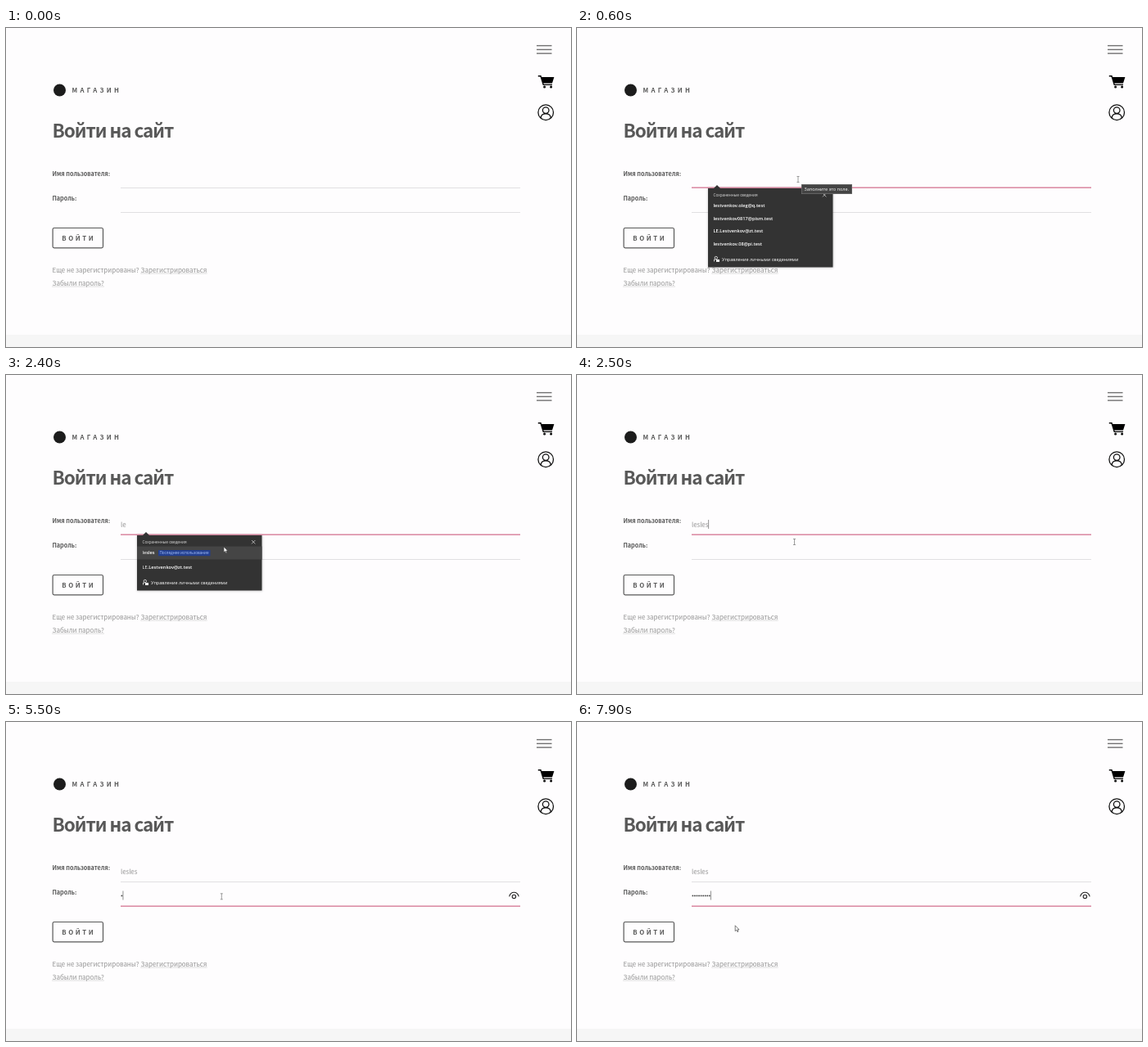
An HTML page with a canvas that plays this animation: 690x390 px, repeating every 8 s.

```html
<!DOCTYPE html>
<html lang="ru">
<head>
<meta charset="utf-8">
<title>Войти на сайт</title>
<style>
html, body { margin: 0; width: 100%; height: 100%; overflow: hidden; background: #fefdfe; }
canvas { display: block; width: 690px; height: 390px; }
</style>
</head>
<body>
<canvas id="stage"></canvas>
<script>
const W = 690, H = 390, LOOP = 8000, STEP = 100;
const PAGE = '"Noto Sans CJK JP", "Noto Sans CJK SC", "Open Sans", sans-serif';
const UI = '"Open Sans", "Noto Sans", sans-serif';
const INK = '#585858', SOFT = '#969696', LINE = '#e1e0e2', PINK = '#dc8ea6', PANEL = '#333333';
const LOGIN = 'lesles';
const MAILS = ['lestvenkov.oleg@q.test', 'lestvenkov0817@pism.test',
  'LE.Lestvenkov@zt.test', 'lestvenkov.08@pi.test'];

// moments of the actions, in ms
const FOCUS_LOGIN = 100, LIST = 200, KEY_1 = 1100, FILTER = 1200, KEY_2 = 1700;
const HOVER = 2400, FILL = 2500, FOCUS_PASS = 4000;
const KEYS = [5500, 5700, 6000, 6300, 6500, 6800, 7200, 7600, 7800];

const canvas = document.getElementById('stage');
const dpr = window.devicePixelRatio || 1;
canvas.width = W * dpr;
canvas.height = H * dpr;
const c = canvas.getContext('2d');
c.scale(dpr, dpr);

const within = (t, from, to) => t >= from && t < to;

function text(s, x, y, size, weight = 400, color = INK, gap = 0, family = PAGE) {
  c.font = `${weight} ${size}px ${family}`;
  c.letterSpacing = gap + 'px';
  c.fillStyle = color;
  c.fillText(s, x, y);
  return c.measureText(s).width;
}

function box(x, y, w, h, color) {
  c.fillStyle = color;
  c.fillRect(x, y, w, h);
}

function stroke(path, color, width) {
  c.strokeStyle = color;
  c.lineWidth = width;
  c.stroke(new Path2D(path));
}

function disc(x, y, r, color) {
  c.fillStyle = color;
  c.beginPath();
  c.arc(x, y, r, 0, Math.PI * 2);
  c.fill();
}

function link(s, x, y) {
  const w = text(s, x, y, 8, 300, SOFT, -0.04);
  c.setLineDash([1, 1]);
  stroke(`M${x} ${y + 1.5}h${w}`, '#bcbcbc', 1);
  c.setLineDash([]);
}

function icons() {
  for (const y of [21.6, 26.4, 31.1]) stroke(`M648 ${y}h18.5`, '#707070', 1.4);

  c.fillStyle = '#000';
  c.fill(new Path2D('M653.6 60H669.4L667 67.6H655.6Z'));
  stroke('M649.8 58.8H653L656.2 69.4H667', '#000', 1.4);
  disc(657.6, 72, 1.5, '#000');
  disc(665.6, 72, 1.5, '#000');

  stroke('M668.5 103.2a9.3 9.3 0 1 1-18.6 0a9.3 9.3 0 1 1 18.6 0' +
    'M663 100.6a3.8 3.8 0 1 1-7.6 0a3.8 3.8 0 1 1 7.6 0' +
    'M653.2 109.6C653.8 103.3 664.6 103.3 665.2 109.6', '#111', 1.3);
}

function page() {
  box(0, 0, W, H, '#fefdfe');
  box(0, 375, W, 15, '#f6f6f6');
  disc(65.5, 76, 7.5, '#1c1c1c');
  text('МАГАЗИН', 80.6, 79.4, 7.8, 900, INK, 3.3);
  text('Войти на сайт', 56.5, 134, 22.5, 700, INK, -1.05);
  text('Имя пользователя:', 56.5, 181, 7.2, 900);
  text('Пароль:', 56.5, 211, 7.2, 900);
  c.strokeStyle = INK;
  c.lineWidth = 1.2;
  c.beginPath();
  c.roundRect(57.1, 244.5, 61.4, 24.4, 1.8);
  c.stroke();
  text('ВОЙТИ', 68.3, 259.8, 7.8, 900, INK, 2.6);
  text('Еще не зарегистрированы?', 56.5, 298.6, 8, 300, SOFT, -0.06);
  link('Зарегистрироваться', 164.6, 298.6);
  link('Забыли пароль?', 56.5, 314.6);
  icons();
}

function field(y, focus) {
  if (focus) box(140, y - 0.6, 488, 1.6, PINK);
  else box(140, y, 488, 1, LINE);
}

function caret(x, y) {
  box(x, y, 0.8, 11, '#777');
}

function ibeam(x, y) {
  stroke(`M${x - 1.5} ${y - 3.5}h3M${x} ${y - 3.5}v7M${x - 1.5} ${y + 3.5}h3`, '#858585', 0.8);
}

function arrow(x, y) {
  const p = new Path2D(`M${x} ${y}v6.8l1.6-1.4l1.1 2.4l1.1-.5l-1-2.3h2Z`);
  c.fillStyle = '#fff';
  c.fill(p);
  c.strokeStyle = '#444';
  c.lineWidth = 0.7;
  c.stroke(p);
}

function tooltip(x, y) {
  box(x, y, 62, 12, '#777');
  box(x + 0.6, y + 0.6, 60.8, 10.8, '#444');
  text('Заполните это поле.', x + 3.5, y + 8, 5.5, 400, '#fff', 0, UI);
}

function panel(bottom) {
  c.save();
  c.shadowColor = 'rgba(0,0,0,.22)';
  c.shadowBlur = 3 * dpr;
  box(160, 196, 152.5, bottom - 196, PANEL);
  c.restore();
  c.fillStyle = PANEL;
  c.fill(new Path2D('M167 196l4-4l4 4Z'));
  text('Сохраненные сведения', 166.5, 206.2, 4.7, 400, '#ddd', 0, UI);
  stroke('M300 202l4.4 4.4m0-4.4l-4.4 4.4', '#ddd', 0.7);
  const y = bottom - 9.5;
  stroke(`M167.5 ${y + 2.5}v-2.5h2M171.5 ${y - 2}a1.7 1.7 0 1 0-3.4 0a1.7 1.7 0 1 0 3.4 0`, '#eee', 0.8);
  box(170, y, 4, 3, '#eee');
  text('Управление личными сведениями', 177, y + 2.3, 5.5, 400, '#fff', 0, UI);
}

// the part already typed is set lighter
function row(s, y, done = 0) {
  const w = text(s.slice(0, done), 166.5, y, 5.7, 400, '#fff', 0, UI);
  text(s.slice(done), 166.5 + w, y, 5.7, 600, '#fff', 0, UI);
}

function fullList() {
  panel(292.5);
  MAILS.forEach((s, i) => row(s, 219 + i * 15.6));
}

function shortList(t) {
  const done = typed(t).length;
  panel(263.5);
  if (t < FILTER + STEP) box(160, 192, 152.5, 3.6, '#080808');
  if (t >= HOVER) box(160, 209.5, 152.5, 16, '#454545');
  row(LOGIN, 219.3, done);
  box(186, 214, 63.5, 7.2, '#233f8f');
  text('Последнее использование', 187.5, 219.4, 4.6, 400, '#a9c4ff', 0, UI);
  row(MAILS[2], 236.5, done);
}

function eye() {
  stroke('M614.6 213.4C616.4 206.6 624.4 206.6 626.2 213.4', '#222', 1.1);
  stroke('M622.6 213.4a2.2 2.2 0 1 1-4.4 0a2.2 2.2 0 1 1 4.4 0', '#222', 1.1);
}

function typed(t) {
  if (t >= FILL) return LOGIN;
  return LOGIN.slice(0, (t >= KEY_1) + (t >= KEY_2));
}

function pointer(t) {
  if (t < FOCUS_LOGIN) return;
  if (t < HOVER) ibeam(270, 185);
  else if (t < FILL) arrow(266, 210);
  else if (t < FILL + STEP) ibeam(265.5, 204);
  else if (t < 7800) ibeam(263.3, 213.3);
  else if (t < 7900) arrow(228, 231);
  else arrow(193.2, 248.8);
}

function draw(t) {
  const onPass = t >= FOCUS_PASS;
  page();
  field(195, t >= FOCUS_LOGIN && !onPass);
  field(225, onPass);

  const w = text(typed(t), 140, 186, 8, 300, SOFT, -0.1);
  const blinkOn = within(t, FOCUS_LOGIN, 600) || within(t, KEY_1, 1600) ||
    within(t, KEY_2, HOVER) || within(t, FILL, 3000) || within(t, 3600, FOCUS_PASS);
  if (blinkOn) caret(140 + w, 177);

  const dots = KEYS.filter(k => t >= k).length;
  for (let i = 0; i < dots; i++) disc(141.4 + i * 2.55, 212.4, 0.95, '#444');
  if (onPass && !within(t, 4600, 5100)) caret(140 + dots * 2.55, 206.5);
  if (dots) eye();

  if (within(t, LIST, FILTER)) fullList();
  if (within(t, FILTER, FILL)) shortList(t);
  if (within(t, 600, KEY_1)) tooltip(274, 191);
  if (within(t, 3800, FOCUS_PASS)) tooltip(267, 220);
  pointer(t);
}

const start = performance.now();
function tick() {
  draw((performance.now() - start) % LOOP);
  requestAnimationFrame(tick);
}
tick();
</script>
</body>
</html>
```
